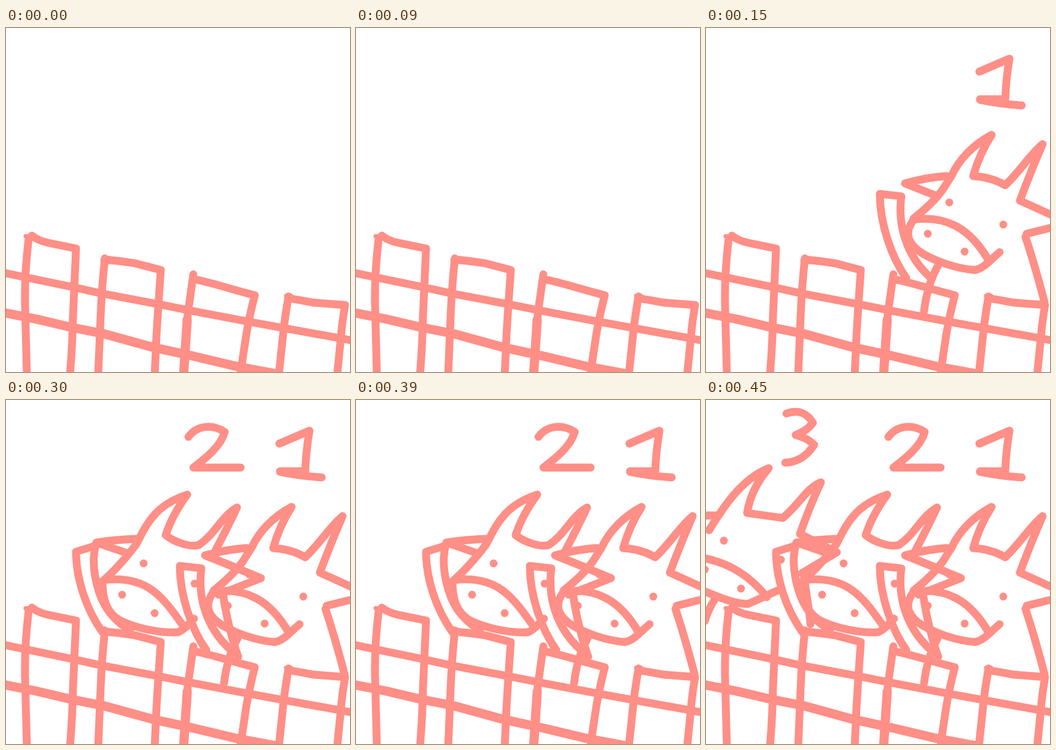
Animation of 560 by 560 pixels, one loop 0.6 s. Source, as an HTML page:

```html
<!DOCTYPE html>
<html lang="en">
<head>
<meta charset="utf-8">
<title>Counting cows</title>
<style>
html, body { margin: 0; width: 100%; height: 100%; overflow: hidden; background: #fff; }
svg { display: block; width: 100vw; height: 100vh; }
path { fill: none; stroke: #ff8f87; stroke-width: 12.8; stroke-linecap: round; stroke-linejoin: round; }
.thin { stroke-width: 7; }
.thick { stroke-width: 15; }
</style>
</head>
<body>
<svg viewBox="0 0 560 560">
  <g id="fence">
    <path d="M37 342Q30 400 31 450L34 566M42 338Q54 347 70 350L114 359L109 470Q108 520 104 566"/>
    <path d="M161 375Q156 420 154 470L150 566M161 377Q185 379 210 383L252 394Q248 450 245 500L242 566"/>
    <path d="M305 401Q301 430 296 465L289 566M306 409C330 413 372 427 405 435Q396 470 391 500L382 560"/>
    <path d="M460 437Q455 465 452 490L444 566M460 440Q480 443 500 447L552 451Q547 480 545 505L539 566"/>
    <path d="M-6 398L110 422L155 432L250 450L300 460L400 479L566 509"/>
    <path class="thick" d="M-6 463L50 474L105 487L160 498L240 520L300 533L380 552L445 564M295 475L289 566"/>
    <path class="thin" d="M32 339L40 340M157 378L164 376M456 436L464 436"/>
  </g>
  <g class="cow">
    <path d="M445 71L494 50Q488 85 487 120M446 116H487M446 117Q480 124 514 126"/>
    <path d="M338 310Q370 285 386 262L400 240C412 214 435 190 465 174Q445 205 435 241C452 242 470 246 487 256C510 235 528 205 548 189Q528 235 511 281L566 306"/>
    <path d="M392 241Q360 243 324 253L372 272M566 324L522 335M520 340Q535 385 551 446"/>
    <path d="M338 312C390 305 430 325 461 380M338 312C325 330 325 345 345 362C370 380 410 392 438 394C455 390 465 375 478 365"/>
    <path d="M326 407C303 375 283 320 283 270L318 274C312 320 325 370 366 407M377 388C365 410 358 435 355 461"/>
    <path d="M396 284h.01M484 320h.01M361 335h.01M421 364h.01"/>
  </g>
  <g class="cow">
    <path d="M297 60C310 42 335 38 356 52C350 75 325 95 305 110H382"/>
    <path d="M160 293Q188 267 212 235C228 205 240 172 295 154Q270 188 260 220C275 232 300 240 314 236C341 218 350 190 376 175Q362 205 341 245L338 258L415 290L346 317"/>
    <path d="M216 226Q180 227 147 232L196 249M354 320C358 350 368 390 378 418"/>
    <path d="M160 293C230 285 255 320 290 370M157 295C157 325 164 347 186 359C210 371 250 380 280 378C295 372 299 361 306 356"/>
    <path d="M157 378C130 340 114 290 114 247L146 237C138 265 146 320 172 350Q187 367 202 374"/>
    <path d="M224 266h.01M307 299h.01M189 317h.01M242 347h.01"/>
  </g>
  <g class="cow">
    <path d="M131 22C150 15 165 22 174 37Q165 50 146 57Q164 61 176 73Q158 101 129 102"/>
    <path d="M5 212C25 180 55 130 102 111Q73 145 67 184L125 192C150 172 165 142 187 134Q168 175 153 218L213 248L156 282M-6 188H17"/>
    <path d="M-6 257C40 265 75 290 99 321M-6 310C30 325 50 332 68 332C88 324 104 315 122 308"/>
    <path d="M14 325Q4 340 -2 360M160 288C163 318 169 345 170 365"/>
    <path d="M29 229h.01M122 260h.01M57 307h.01M-2 276h.01"/>
  </g>
</svg>
<script>
const cows = document.querySelectorAll(".cow");
const STEP = 150;

function draw() {
  const shown = Math.floor(performance.now() / STEP) % 4;
  cows.forEach((cow, i) => cow.setAttribute("visibility", i < shown ? "visible" : "hidden"));
  requestAnimationFrame(draw);
}
draw();
</script>
</body>
</html>
```
